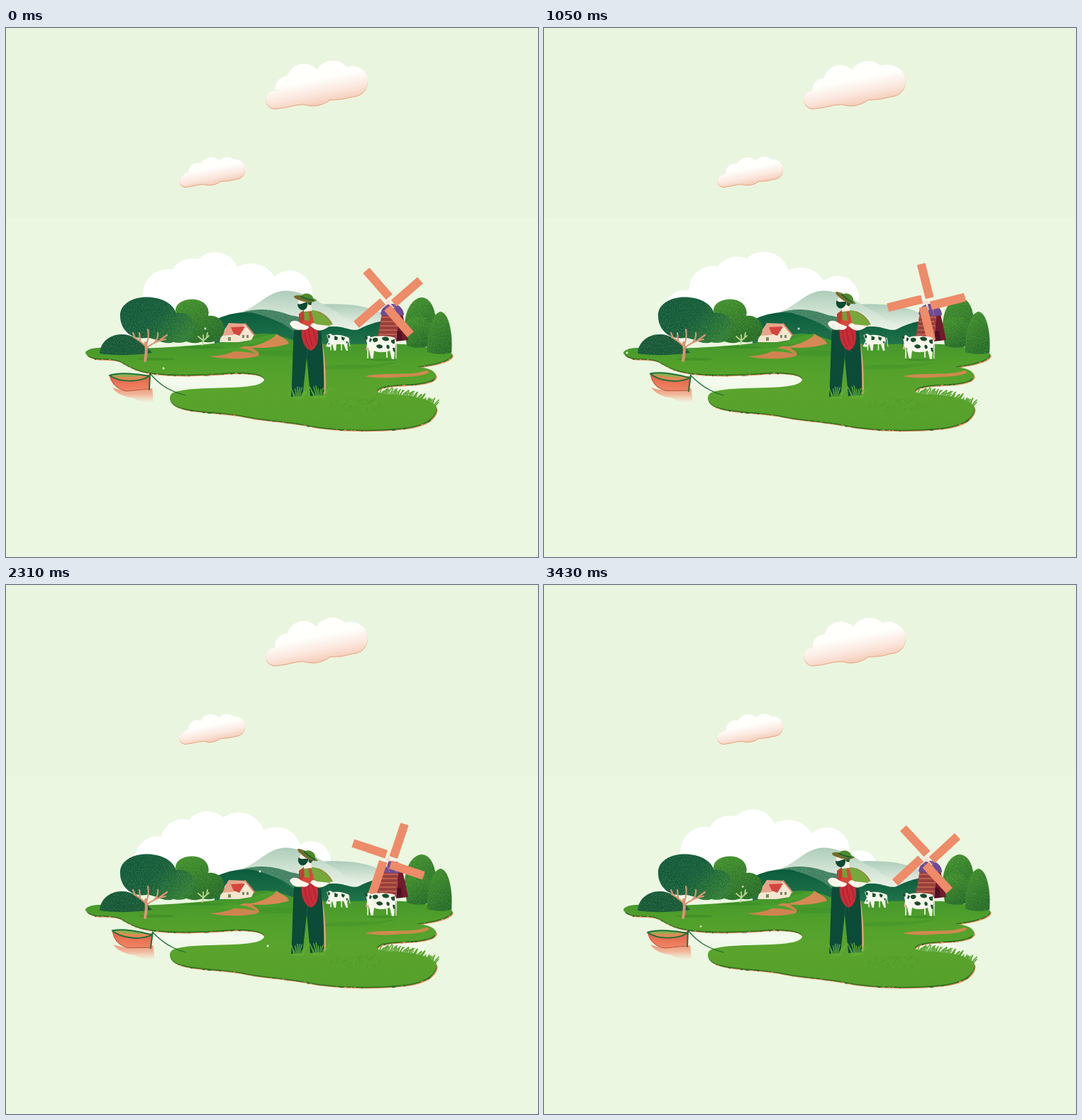
Recreate the animation shown at these times as an HTML page. Size 750 by 746 pixels, loop 3500 ms.

```html
<!DOCTYPE html>
<html lang="en">
<head>
<meta charset="utf-8">
<title>Farm island</title>
<style>
html, body { margin: 0; width: 100%; height: 100%; overflow: hidden; background: #ebf7e1; }
svg { display: block; width: 100vw; height: 100vh; }
.puff { filter: drop-shadow(.8px 1px .3px #e7a27c); }
.line { fill: none; stroke-linecap: round; stroke-linejoin: round; }
</style>
</head>
<body>
<svg viewBox="0 0 750 746" xmlns="http://www.w3.org/2000/svg">
<defs>
  <linearGradient id="blush" gradientUnits="userSpaceOnUse" x1="430" y1="56" x2="441" y2="112">
    <stop offset=".3" stop-color="#fff"/><stop offset=".65" stop-color="#fbe7e0"/><stop offset="1" stop-color="#f4c4b0"/>
  </linearGradient>
  <linearGradient id="mist" x1="0" y1="0" x2="0" y2="1">
    <stop offset="0" stop-color="#a9cab9"/><stop offset=".5" stop-color="#cfe2d5"/><stop offset="1" stop-color="#f0f6ee"/>
  </linearGradient>
  <linearGradient id="pine" x1="0" y1="0" x2="1" y2=".6">
    <stop offset="0" stop-color="#0a5436"/><stop offset=".55" stop-color="#105a37"/><stop offset="1" stop-color="#2a7832"/>
  </linearGradient>
  <linearGradient id="leaf" x1="0" y1="0" x2=".5" y2="1">
    <stop offset="0" stop-color="#3f9129"/><stop offset="1" stop-color="#226a24"/>
  </linearGradient>
  <linearGradient id="ridge" x1="0" y1="0" x2="0" y2="1">
    <stop offset="0" stop-color="#0b5c3d"/><stop offset="1" stop-color="#24784d"/>
  </linearGradient>
  <linearGradient id="grass" x1="0" y1="0" x2="0" y2="1">
    <stop offset="0" stop-color="#3f932c"/><stop offset=".3" stop-color="#51a02b"/><stop offset=".6" stop-color="#5aa42d"/><stop offset="1" stop-color="#55a02b"/>
  </linearGradient>
  <linearGradient id="hull" x1="0" y1="0" x2="0" y2="1">
    <stop offset="0" stop-color="#e55f45"/><stop offset="1" stop-color="#ef8766"/>
  </linearGradient>
  <linearGradient id="mirror" x1="0" y1="0" x2="0" y2="1">
    <stop offset="0" stop-color="#ee9274"/><stop offset=".5" stop-color="#f3ab8e" stop-opacity=".8"/><stop offset="1" stop-color="#f6c9b4" stop-opacity=".1"/>
  </linearGradient>
  <filter id="soft" x="-30%" y="-60%" width="160%" height="220%"><feGaussianBlur stdDeviation="5"/></filter>
  <filter id="rough" x="-2%" y="-5%" width="104%" height="110%">
    <feTurbulence type="fractalNoise" baseFrequency=".25" seed="7"/>
    <feDisplacementMap in="SourceGraphic" scale="3" xChannelSelector="R" yChannelSelector="G"/>
  </filter>
  <filter id="grain" x="0" y="0" width="100%" height="100%" color-interpolation-filters="sRGB">
    <feTurbulence type="fractalNoise" baseFrequency=".85" numOctaves="2" seed="4"/>
    <feColorMatrix values="0 0 0 0 1  0 0 0 0 1  0 0 0 0 .8  .5 0 0 0 -.2"/>
    <feComposite in2="SourceAlpha" operator="in"/>
    <feMerge><feMergeNode in="SourceGraphic"/><feMergeNode/></feMerge>
  </filter>
  <path id="land" d="M112,457 C118,450 135,450 160,453 C200,452 250,450 300,444 C330,436 350,430 366,431 C390,432 400,441 420,444 C460,448 520,444 560,446 C590,448 615,455 629,459 C630,466 615,471 600,474 C590,476 580,477 580,478 C595,479 607,484 606,491 C603,500 580,502 555,503 C535,504 523,507 523,512 C528,518 545,516 570,519 C590,522 606,528 607,536 C606,550 590,561 560,564 C520,568 470,568 430,561 C390,553 360,553 330,546 C300,541 265,541 245,535 C230,530 227,519 236,514 C250,508 290,508 320,507 C345,506 364,503 364,495 C362,487 340,485 315,486 C280,489 240,490 212,487 C185,484 175,478 165,472 C155,465 140,467 128,466 C118,464 112,461 112,457Z"/>
  <path id="puffBase" d="M378,113.500 C396,113 405,107.500 420,107.500 C436,112 447,108 457,101 C470,101 486,98 492,95 L505,80 L485,62 L440,62 L400,75 L380,92Z"/>
</defs>

<rect width="750" height="746" fill="#eaf5df"/>
<rect x="1" y="268" width="749" height="478" fill="#ebf7e1"/>

<g class="puff"><g id="puffA" fill="url(#blush)" filter="url(#grain)">
  <use href="#puffBase"/><circle cx="379" cy="101" r="12.500"/><circle cx="488.500" cy="75" r="21.500"/>
</g></g>
<g class="puff"><g transform="translate(245 180.500) scale(.643) translate(-367 -46)">
  <g id="puffB" fill="url(#blush)" filter="url(#grain)">
    <use href="#puffBase"/><circle cx="379" cy="101" r="12.500"/><circle cx="488.500" cy="75" r="21.500"/>
  </g>
</g></g>

<g id="bank" fill="#fff">
  <path d="M156,438 L200,400 L235,370 L290,350 L350,365 L405,378 L430,402 V435 H158Z"/>
</g>

<!-- hills -->
<g filter="url(#grain)">
  <path d="M420,394 C442,388 462,389 480,390 C500,391 518,396 534,404 V428 H420Z" fill="url(#mist)"/>
  <path d="M326,402 C350,397 364,377 384,372 C400,368 412,373 426,378 C444,386 452,394 466,400 C476,408 486,414 500,420 L500,432 L326,432Z" fill="url(#mist)"/>
  <path d="M330,402 C352,394 376,397 392,402 C406,408 416,405 430,414 L440,440 H330Z" fill="#3d7f61"/>
</g>
<path d="M294,412 C312,403 332,399 350,402 C370,408 388,414 402,425 L436,450 H294Z" fill="url(#ridge)"/>
<path d="M395,434 C430,428 446,420 466,421 C480,422 488,428 497,425 C512,417 526,413 548,411 V452 H395Z" fill="url(#ridge)"/>

<!-- water glow and island -->
<g fill="#fff" opacity=".45" filter="url(#soft)">
  <ellipse cx="285" cy="498" rx="85" ry="10"/><ellipse cx="560" cy="510" rx="34" ry="6"/>
</g>
<use href="#land" fill="#e3925f" transform="translate(1.600 2.600)"/>
<use href="#land" fill="#2a6c20" transform="translate(.4 1.600)" filter="url(#rough)"/>
<use href="#land" fill="url(#grass)"/>
<g fill="#2f8424" opacity=".45">
  <ellipse cx="276" cy="450" rx="30" ry="2"/><ellipse cx="212" cy="467" rx="26" ry="2"/>
  <ellipse cx="385" cy="459" rx="42" ry="4" opacity=".5"/>
  <path d="M435,480 C470,470 500,480 555,470 C535,480 480,484 435,480Z" opacity=".5"/>
</g>
<path d="M287,463 C306,462 316,459 325,454 C334,447 345,447 351,454 C357,457 358,461 354,463 C335,468 305,467 287,463Z" fill="#cf8450"/>
<path d="M340,450 C360,447 374,440 381,431 C389,437 397,439 399,445 C388,449 365,453 340,450Z" fill="#d58955"/>
<path d="M294,456 C316,449 338,449 354,460 C345,456 315,455 294,456Z" fill="#4ba32c"/>
<path d="M332,447 C350,437 366,434 382,431 C376,440 360,446 332,447Z" fill="#4a9f2e"/>
<path d="M506,491 C530,485 572,491 592,483 C602,484 595,491 560,492 C540,494 520,494 506,491Z" fill="#cd8a4c"/>
<g id="tufts" class="line" stroke="#458f24" stroke-width=".9"></g>

<!-- house -->
<path d="M301,443 L304,431 L314,417 L337,417 L350,432 L346,440 L328,443Z" fill="#f4e6d2"/>
<path d="M314,416 L338,417 L327,431 L319,433 L304,434Z" fill="#e7a58b"/>
<path d="M317,422 L337,421 L329,434 L321,431Z" fill="#d5453c"/>
<path d="M337,417 L350,433" class="line" stroke="#d88669" stroke-width="2"/>
<path d="M313,436h4v5h-4zM333,433h3v4h-3zM339,433h3v4h-3z" fill="#7a8a5b"/>

<!-- right trees -->
<g fill="url(#leaf)" filter="url(#grain)">
  <path d="M562,425 C561,398 573,381 586,380 C600,381 607,398 607,428 V448 H565Z"/>
  <path d="M564,436 C561,415 568,406 582,407 C597,407 602,420 600,446 C594,452 572,452 566,448Z"/>
  <path d="M594,457 C593,428 600,402 613,400 C626,403 630,436 628,458 C616,461 604,460 594,457Z"/>
</g>

<!-- mill -->
<path d="M530,402 L553,402 L550,442 L523,440Z" fill="#9a3f3b"/>
<path d="M553,402 L559,403 L567,440 L550,442Z" fill="#741a2d"/>
<path d="M530,408H552M529,414H551M528,420H551M527,426H550M526,432H550M525,437H549" class="line" stroke="#c66c57" stroke-width="1.300"/>
<path d="M552,427 L557,427 L559,441 L551,441Z" fill="#4c1226"/>
<path d="M528,404 C529,393 537,388 546,389 C555,390 561,397 561,405 C551,407 538,407 528,404Z" fill="#6e4b93"/>
<path d="M536,393 L541,405 M547,390 L550,405" class="line" stroke="#9678b4" stroke-width="1"/>
<g id="sails"></g>

<!-- cows -->
<g id="cowFar">
  <path d="M460,434 C466,431 476,434 482,436 C485,441 482,445 481,447 L482,455 L479.500,455 L476,446 L466,446 L465,455 L462.500,455 L460,446Z" fill="#f3f6e8"/>
  <path class="line" d="M458,444V454M473,446V454" stroke="#e9efdc" stroke-width="1.600"/>
  <path d="M452,433 L457,431 L464,435 L461,445 L456,450 L451,449 L455,441Z" fill="#f8faf0"/>
  <path d="M453,432l4,2l-1,4l-2,-1zM463,434l5,2l-1,4l-4,0zM473,435l5,2l-2,4l-3,-2zM479,442l3,0l-1,4zM454,445l2,-1l0,3z" fill="#1e522e"/>
</g>
<path d="M483,437 C485,442 483,446 485,449" class="line" stroke="#f3f6e8" stroke-width="1"/>
<ellipse cx="530" cy="468" rx="22" ry="1.500" fill="#2f8424" opacity=".5"/>
<path d="M512,437 C522,433 540,434 548,437 C550,444 549,451 548,455 L547,467 L544,467 L541,455 C534,458 524,458 519,455 L517.500,466 L514.500,466 L512,455Z" fill="#f6f8ec"/>
<path class="line" d="M510,454V465M537,456V464" stroke="#e3ecd5" stroke-width="2"/>
<path d="M517,438c5,-3 9,0 7,3s-8,3 -7,-3zM530,437c5,-3 10,-1 10,2s-9,4 -10,-2zM543,440l5,-1l0,6c-3,1 -6,-2 -5,-5zM522,448c3,-3 8,-2 9,1s-8,5 -9,-1zM537,447c3,-1 5,3 3,5s-5,-2 -3,-5zM545,451l3,0l0,6l-2,-1z" fill="#1c4d2c"/>
<path d="M549,440 C552,448 549,458 550,466" class="line" stroke="#f6f8ec" stroke-width="1.200"/>
<g id="cowHead">
  <path d="M507,436 L512,434 L517,438 L516,446 L512,454 L508,454 L509,445Z" fill="#fbfcf4"/>
  <path d="M506,434l4,2l-1,4l-3,-2zM513,437l3,2l-2,4l-2,-1z" fill="#1c4d2c"/>
  <ellipse cx="509.500" cy="452.500" rx="2.300" ry="1.700" fill="#e9a990"/>
</g>

<!-- farmer -->
<path d="M440,428 C450,440 451,490 451,517 H446Z" fill="#e3a075"/>
<path d="M406,426 L444,427 C447,450 449,490 448,518 L429,519 L424,464 L418,520 L402,520 C404,490 404,455 406,426Z" fill="#0b4b38"/>
<path d="M424,464 L426,444" class="line" stroke="#17614a" stroke-width="1"/>
<path d="M417,400 L429,398 L440,400 L444,427 L412,426Z" fill="#6fa336"/>
<path d="M413,403 L420,398 L421,420 L413,422Z" fill="#c83a30"/>
<path d="M426,398 L431,398 L435,421 L428,422 L417,418 L420,412 L428,413Z" fill="#d9473a"/>
<path d="M430,398 C442,398 454,405 460,417 C455,422 446,424 439,421 L434,414Z" fill="#76a83b"/>
<path d="M440,400 C450,404 456,410 460,418" class="line" stroke="#a5763f" stroke-width="1.200"/>
<path d="M417,422 L438,420 C442,436 440,451 430,455 C420,452 415,437 417,422Z" fill="#c92d37"/>
<path d="M421,424Q421,440 428,451M426,424Q428,438 432,448M432,423Q436,434 437,442" class="line" stroke="#9e1f30" stroke-width="1"/>
<path d="M400,417 C403,411 410,412 417,417 L427,421 C427,425 420,427 416,425 C410,427 403,424 400,417Z" fill="#fdf6ec"/>
<path d="M456,420 C449,427 440,428 434,424 L429,420 C430,416 434,415 438,418Z" fill="#fdf6ec"/>
<path d="M420,392 L430,389 L431,399 L420,400Z" fill="#fdf0e4"/>
<g id="head">
  <path d="M412,383 L427,384 L430,391 L424,397 L413,394Z" fill="#fdf1e6"/>
  <path d="M411,389 C416,391 420,387 425,386 C426,393 423,398 418,398 C414,397 411,394 411,389Z" fill="#0c4a33"/>
  <path d="M425,383 L432,384 L430,391 L426,390Z" fill="#25562f"/>
  <path d="M406,378 C414,375 432,380 438,384 C434,388 421,387 414,384 C409,382 406,381 406,378Z" fill="#76692c"/>
  <path d="M411,377 C420,376 432,380 438,384 C434,387 424,384 411,377Z" fill="#5f8a2f"/>
  <path d="M416,380 C416,375 424,373 429,376 C433,378 434,382 433,385 C427,385 420,383 416,380Z" fill="#4e8a2d"/>
  <path d="M416,379 Q425,383 433,384" class="line" stroke="#1e5a2c" stroke-width="1.800"/>
</g>
<g id="feet" class="line" stroke="#64ae36" stroke-width="1.300"></g>

<!-- left trees -->
<g filter="url(#grain)">
  <path d="M132,459 C133,442 148,431 165,432 C183,433 197,447 206,458 C180,462 150,462 132,459Z" fill="#105433"/>
  <path d="M239,397 C241,385 256,381 268,383 C281,385 288,396 285,406 C298,404 309,414 308,426 C306,440 291,446 277,442 C262,448 248,442 242,430Z" fill="url(#leaf)"/>
  <path d="M161,408 C159,388 182,377 206,380 C225,382 236,391 240,402 C255,400 267,410 266,422 C266,438 252,447 236,443 C222,448 210,436 198,437 C178,440 162,427 161,408Z" fill="url(#pine)"/>
</g>
<g class="line" stroke="#d99474">
  <path d="M196,469 Q199,455 197,444" stroke-width="4"/>
  <path d="M197,449 Q188,440 180,436 M197,452 Q210,441 225,439 M198,446 Q202,436 200,425 M189,441 L188,430 M209,444 Q215,438 214,430 M217,440 L227,433 M182,437 L179,430" stroke-width="2.200"/>
</g>
<path d="M277,447 Q279,440 278,433 M278,441 L286,434 M278,441 L271,435 M283,436 L284,430" class="line" stroke="#b8d58c" stroke-width="1.800"/>

<!-- boat -->
<path id="shade" d="M150,507 C164,513 188,512 206,508 L208,526 C200,530 186,527 180,522 C170,521 156,517 150,507Z" fill="url(#mirror)"/>
<g id="boat">
  <path d="M146,490 C148,502 157,510 170,512 L202,509 L204,488 C185,494 160,493 146,490Z" fill="url(#hull)"/>
  <path d="M146,490 C160,485 188,488 202,491 C188,499 160,499 146,490Z" fill="#e08a55"/>
  <path d="M147,490 C160,486 180,488 192,490 C180,493 160,493 147,490Z" fill="#8fae52"/>
  <path d="M146,490 C160,485 188,488 202,491 C188,500 160,500 146,490 M203,487 L202,510" class="line" stroke="#1d7238" stroke-width="2"/>
  <path d="M147,492 C150,503 158,510 170,512 L202,509" class="line" stroke="#b5553a" stroke-width="1"/>
</g>
<path id="rope" class="line" stroke="#1d6a35" stroke-width="1.200"/>
<g id="motes" fill="#f4fbea"></g>
</svg>
<script>
const LOOP = 3500, STEP = 70;
const $ = id => document.getElementById(id);

function add(parent, tag, attrs) {
  const el = document.createElementNS('http://www.w3.org/2000/svg', tag);
  return set($(parent).appendChild(el), attrs);
}
function set(el, attrs) {
  for (const k in attrs) el.setAttribute(k, attrs[k]);
  return el;
}

let seed = 11;
const rnd = () => (seed = seed * 16807 % 2147483647) / 2147483647;

// Grass
const blade = (parent, x, y, dx, h, attrs) =>
  add(parent, 'path', { d: `M${x},${y}q${dx * .2},${-h * .6} ${dx},${-h}`, ...attrs });
for (let i = 0; i < 46; i++) {
  const u = i / 45;
  blade('tufts', 527 + u * 78, 517 + u * u * 18, 2 + rnd() * 5, 5 + rnd() * 6, { stroke: '#58a32d', 'stroke-width': 1.5 });
}
for (let i = 0; i < 60; i++) {
  const a = rnd() * 6.28, r = Math.sqrt(rnd());
  blade('tufts', 497 + Math.cos(a) * r * 40, 532 + Math.sin(a) * r * 10, 1.5, 2, { opacity: .6 });
}
for (let i = 0; i < 9; i++) blade('feet', 406 + i * 1.6, 522, (i - 3) * 1.6, 8 + rnd() * 9);
for (let i = 0; i < 10; i++) blade('feet', 434 + i * 1.6, 522, (i - 4) * 1.7, 9 + rnd() * 10);

// Mill
for (let a = 0; a < 360; a += 90) {
  add('sails', 'path', { d: 'M0,0V-11', stroke: '#fbe9dc', 'stroke-width': 2.4, transform: `rotate(${a})` });
  add('sails', 'rect', { x: 0, y: -54.5, width: 12, height: 49.5, rx: .8, fill: '#ee8b68', transform: `rotate(${a})` });
}
add('sails', 'circle', { r: 2.6, fill: '#f7ddd0' });

// Each bump slides into the place of the next one: [x, y, radius, lift on the way]
function makeChain(parent, pts) {
  const dots = pts.slice(1).map(() => add(parent, 'circle', {}));
  return p => dots.forEach((dot, i) => {
    const [cx, cy, r] = pts[i].map((v, k) => v + (pts[i + 1][k] - v) * p);
    const lift = (pts[i][3] || 0) * Math.sin(Math.PI * p);
    set(dot, { cx, cy: cy - lift, r });
  });
}
const puffPts = [[379, 102, 10], [397, 86, 18], [420, 75, 24.5], [461, 73, 27], [487, 74, 22]];
const puffA = makeChain('puffA', puffPts);
const puffB = makeChain('puffB', puffPts);
const bank = makeChain('bank', [[186, 408, 26], [228, 375, 35], [262, 357, 32], [295, 350, 34, 6.5],
  [345, 372, 40, -3], [400, 374, 32, 3], [446, 400, 25]]);

// Drifting motes: [time, x, y]
const motes = [[0, 222, 480], [0, 281, 424], [630, 249, 445], [1050, 359, 424], [1050, 117, 458],
  [1610, 152, 447], [1610, 312, 413], [2310, 369, 509], [2310, 358, 404], [2870, 241, 427], [2870, 395, 474]]
  .map(([at, x, y]) => ({ at, x, y, el: add('motes', 'circle', { r: 1.4 }) }));

function draw(ms) {
  const t = ms / LOOP;
  puffA(t * 3 % 1);
  puffB((t * 3 + .39) % 1);
  bank(t);
  set($('sails'), { transform: `translate(539 387) rotate(${-41 + 90 * t})` });

  const beat = Math.round(ms / STEP) % 10;
  const tilt = beat > 2 && beat < 8;
  set($('head'), { transform: tilt ? 'translate(1 0) rotate(20 425 388)' : '' });
  set($('boat'), { transform: tilt ? 'translate(3 0) rotate(5 175 498)' : '' });
  set($('shade'), { transform: tilt ? 'translate(1.5 0)' : '' });
  set($('rope'), { d: tilt ? 'M207,490C220,503 232,512 253,518' : 'M203,487C216,503 230,512 253,518' });

  const graze = ms > 300 && ms < 2000;
  set($('cowFar'), { transform: graze ? 'translate(-1.5 0)' : '' });
  set($('cowHead'), { transform: graze ? 'translate(-1.5 -1)' : '' });

  for (const m of motes) {
    const d = (ms - m.at + LOOP * 1.5) % LOOP - LOOP / 2;
    set(m.el, { cx: m.x + d * .012, cy: m.y - d * .02, opacity: Math.max(0, 1 - Math.abs(d) / 280) });
  }
}

const start = performance.now();
function tick() {
  const ms = (performance.now() - start) % LOOP;
  draw(Math.floor(ms / STEP) * STEP);
  requestAnimationFrame(tick);
}
tick();
</script>
</body>
</html>
```
